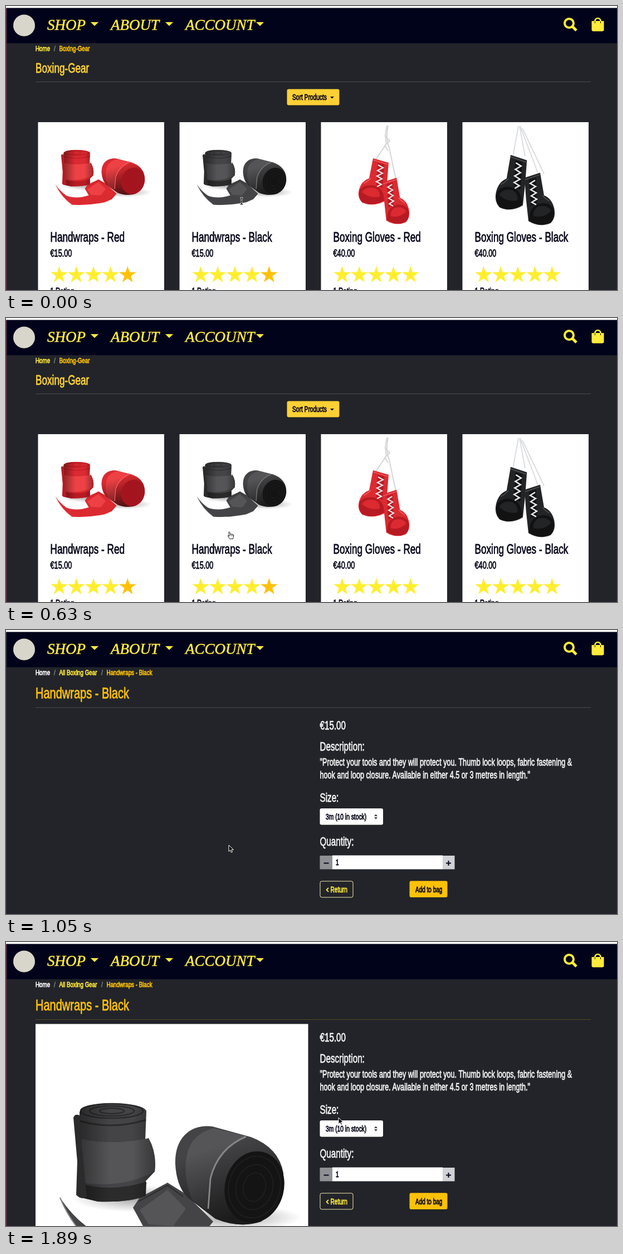
These frames come from a looping animation (1097x511 px, 1960 ms). An HTML page:

```html
<!DOCTYPE html>
<html lang="en">
<head>
<meta charset="utf-8">
<title>Boxing gear shop</title>
<style>
  html, body { margin: 0; height: 100%; overflow: hidden; background: #222429; }
  svg { display: block; width: 100%; height: 100%; }
  .body { font-family: "Liberation Sans", Arial, sans-serif; stroke-width: .8; }
  .nav { font: italic 27px "Liberation Serif", "Times New Roman", serif; fill: #ffeb3b; stroke: #ffeb3b; stroke-width: .6; }
</style>
</head>
<body>
<svg id="stage" viewBox="0 0 1097 511" xmlns="http://www.w3.org/2000/svg"></svg>
<script>
const LOOP = 1960, TICK = 70;
const CONDENSE = 0.715; // one narrow face for all body text
const YELLOW = '#ffeb3b', AMBER = '#ffc107', INK = '#07071a', PALE = '#f1f1f2';

const text = (x, y, size, str, fill) =>
  `<text class="body" transform="translate(${x} ${y}) scale(${CONDENSE} 1)" font-size="${size}" fill="${fill}" stroke="${fill}">${str}</text>`;
const rect = (x, y, w, h, fill, r = 0, more = '') =>
  `<rect x="${x}" y="${y}" width="${w}" height="${h}" rx="${r}" fill="${fill}" ${more}/>`;
const path = (d, fill, more = '') => `<path d="${d}" fill="${fill}" ${more}/>`;
const line = (d, color, width, more = '') =>
  path(d, 'none', `stroke="${color}" stroke-width="${width}" ${more}`);
const ellipse = (x, y, rx, ry, fill, more = '') =>
  `<ellipse cx="${x}" cy="${y}" rx="${rx}" ry="${ry}" fill="${fill}" ${more}/>`;
const group = (content, attrs) => `<g ${attrs}>${content}</g>`;
const caret = (x, y, w, h, fill) => path(`M${x} ${y}h${w}l${-w / 2} ${h}z`, fill);

function star(cx, cy, r, fill) {
  const points = Array.from({ length: 10 }, (_, i) => {
    const a = i * Math.PI / 5, d = i % 2 ? r * 0.39 : r;
    return `${(cx + d * Math.sin(a)).toFixed(1)},${(cy - d * Math.cos(a)).toFixed(1)}`;
  });
  return `<polygon points="${points.join(' ')}" fill="${fill}"/>`;
}

const RED = { main: '#dc2a31', band: '#ee4145', dark: '#b81a23', face: '#a3141e', edge: '#f4696b' };
const BLACK = { main: '#444446', band: '#555557', dark: '#2b2b2c', face: '#141415', edge: '#858587' };
const BLACK_GLOVE = { main: '#232425', dark: '#121213', edge: '#505153' };

// Two rolled wraps and a loose strip, at the size of the product page.
function wraps(c) {
  const rings = (x, y, radii, width, more) => radii.map(([rx, ry]) =>
    ellipse(x, y, rx, ry, 'none', `stroke="${c.dark}" stroke-width="${width}" ${more}`)).join('');
  const tilt = 'transform="rotate(14 446 441)"';
  const standing = 'M132 306Q137 291 188 290Q246 291 252 304L250 356L256 353Q271 380 267 413L251 430V457Q220 469 165 467L132 459Z';
  const lying = 'M304 400C302 350 334 327 371 332L440 351Q490 370 498 416Q499 472 458 503Q420 516 376 498L325 459Q306 438 304 400Z';

  const strip = path('M97 460Q118 492 145 512Q190 530 246 511L228 478L240 460L290 433L322 453L372 503L350 530L318 545Q235 562 170 556Q121 518 97 460Z', c.main)
    + path('M240 482L290 446L323 480L300 511L256 508Z', c.band)
    + line('M238 467L290 438L318 458', c.dark, 2)
    + line('M97 460Q121 518 170 556', c.edge, 2);
  const leftRoll = path(standing, c.main)
    + rings(190, 304, [[56, 13], [40, 9], [22, 5]], 2.5, '')
    + line('M133 322Q190 339 251 320M137 437Q190 452 252 433', c.dark, 3)
    + path('M133 354Q190 367 256 353Q271 380 267 413Q210 444 133 433Z', c.band)
    + path('M134 437Q195 450 252 432L251 457Q220 469 165 467L132 459Z', c.dark)
    + path(standing, 'url(#round)')
    + path('M121 316Q124 308 132 312L137 376L145 458Q136 465 126 455L128 395Z', c.dark);
  const rightRoll = path(lying, c.main)
    + path('M323 396Q326 348 372 335L431 349Q383 372 365 423L360 484L334 464Q320 430 323 396Z', c.band)
    + path(lying, 'url(#fall)')
    + line('M431 350Q381 371 367 425L363 480', c.edge, 3)
    + ellipse(446, 441, 53, 65, c.face, tilt)
    + rings(446, 441, [[46, 56], [33, 41], [20, 26]], 2, tilt + ' opacity=".45"');
  return ellipse(235, 462, 115, 24, 'url(#shade)') + ellipse(405, 496, 125, 24, 'url(#shade)')
    + strip + leftRoll + rightRoll;
}

// Left-hand glove in a 56 by 84 box.
function glove(c, transform) {
  return group(
    path('M27 0L55 8Q53 42 48 77Q28 88 8 80Q-2 71 2 56Q6 41 20 36Z', c.main)
    + path('M3 57Q12 45 32 50Q47 56 47 76Q26 87 8 79Q0 71 3 57Z', c.dark)
    + path('M7 61Q14 50 31 54Q40 59 39 69Q22 73 7 61Z', c.main)
    + line('M27 3L54 11M23 36Q16 43 10 45', c.edge, 1.3)
    + path('M35 8L47 11L44 53L33 50Z', c.dark)
    + line('M36 12l9 5l-10 5l9 5l-10 5l9 5l-10 5l9 5l-8 4', '#e9e9e9', 2.2), `transform="${transform}"`);
}

const smallWraps = (x, c) => group(wraps(c), `transform="translate(${x - 9.1} 151.7) scale(.397 .37)"`);

const redGloves = line('M684 215Q679 233 683 248L664 276M686 215Q681 238 688 255L701 317M680 233l9 10l-9 8l6 10', '#d5d6d8', 2)
  + glove(RED, 'translate(632 274)')
  + glove(RED, 'translate(725 309) scale(-.88 1)');
const blackGloves = line('M920 216L910 271M922 216L932 270M923 216L956 303M927 220L966 302', '#dcdde0', 2)
  + glove(BLACK_GLOVE, 'translate(878 268) scale(1.04 1.18)')
  + glove(BLACK_GLOVE, 'translate(986 300) scale(-1 1.13)');

function card(i, name, price, lastStar, picture) {
  const x = 57.5 + 254 * i;
  const stars = [0, 1, 2, 3, 4].map(n =>
    star(x + 38 + 30.7 * n, 484, 16, n === 4 ? lastStar : '#ffee2e')).join('');
  return rect(x, 209, 226.5, 302, '#fff') + picture
    + text(x + 22, 424, 24, name, INK) + text(x + 22, 451, 17.8, price, INK)
    + stars + text(x + 22, 519, 16, '1 Rating', INK);
}

const navbar = rect(0, 0, 1097, 4, '#fbfdfc') + rect(0, 3.5, 1097, 63.5, '#01031b')
  + '<circle cx="32.5" cy="35" r="19.5" fill="#d8d6cb"/>'
  + [['SHOP', 74, 152], ['ABOUT', 188, 286], ['ACCOUNT', 322, 449]].map(([label, x, arrow]) =>
    `<text class="nav" x="${x}" y="43">${label}</text>` + caret(arrow, 29, 14, 7, YELLOW)).join('');

const icons = line('M1017 37L1024 44', YELLOW, 5)
  + `<circle cx="1011" cy="31" r="8" fill="none" stroke="${YELLOW}" stroke-width="4"/>`
  + path('M1051.5 27h22v15.500q0 3-3 3h-16q-3 0-3-3z', YELLOW)
  + line('M1057.5 31v-4a5 5 0 0 1 10 0v4', '#01031b', 1)
  + line('M1057.5 27.500v-.5a5 5 0 0 1 10 0v.5', YELLOW, 2.6);

const crumb = (x, str, fill) => text(x, 81, 13.7, str, fill);
const slash = x => crumb(x, '/', '#7b8086');

const listing = crumb(53, 'Home', YELLOW) + slash(86) + crumb(95.5, 'Boxing-Gear', AMBER)
  + text(53, 120, 24, 'Boxing-Gear', '#fdd335')
  + rect(53, 136, 997, 1, '#4b4c4f')
  + rect(504.5, 149.5, 94, 29, '#fdd034', 3)
  + text(514, 169, 14.3, 'Sort Products', INK) + caret(582, 163, 7, 3.5, INK)
  + card(0, 'Handwraps - Red', '€15.00', AMBER, smallWraps(60, RED))
  + card(1, 'Handwraps - Black', '€15.00', AMBER, smallWraps(314, BLACK))
  + card(2, 'Boxing Gloves - Red', '€40.00', '#ffee2e', redGloves)
  + card(3, 'Boxing Gloves - Black', '€40.00', '#ffee2e', blackGloves);

const heading = (y, str) => text(563.5, y, 21.3, str, PALE);

const detail = crumb(53, 'Home', '#fff') + slash(86) + crumb(95.5, 'All Boxing Gear', YELLOW)
  + slash(171) + crumb(180.5, 'Handwraps - Black', AMBER)
  + text(53, 123, 28, 'Handwraps - Black', AMBER)
  + '<rect id="rule" x="53" y="139" width="997" height="1"/>'
  + heading(179, '€15.00') + heading(217, 'Description:')
  + text(563.5, 244, 17.7, '"Protect your tools and they will protect you. Thumb lock loops, fabric fastening &amp;', PALE)
  + text(563.5, 267, 17.7, 'hook and loop closure. Available in either 4.5 or 3 metres in length."', PALE)
  + heading(309, 'Size:')
  + rect(563.5, 321, 113.5, 29.5, '#fff', 3) + text(574, 341, 14.4, '3m (10 in stock)', INK)
  + path('M661 335l3-3.500l3 3.500zM661 337l3 3.500l3-3.500z', '#343a40')
  + heading(388, 'Quantity:')
  + rect(563.5, 406, 22.5, 24.5, '#8f9094') + rect(586, 405.5, 198, 25, '#fff') + rect(784, 406, 21.5, 24.5, '#d0d2d5')
  + rect(570.5, 418.5, 9, 2, INK) + rect(790, 418.5, 9, 2, INK) + rect(793.5, 415, 2, 9, INK)
  + text(592, 423, 14, '1', INK)
  + rect(564, 452, 59, 29, 'none', 3, 'stroke="#f4eab0"')
  + line('M579 464l-3.500 3.500l3.500 3.500', YELLOW, 1.8) + text(582.5, 472, 14.1, 'Return', YELLOW)
  + rect(724.5, 451.5, 68, 29.5, AMBER, 3) + text(735, 472, 14, 'Add to bag', INK);

const photo = rect(53, 147.5, 489.5, 363.5, '#fff') + wraps(BLACK);

const outlined = 'stroke-width="1" stroke-linejoin="round"';
const beam = 'M-2.500-6q2.500 0 2.500 2v8q0 2-2.500 2M2.500-6q-2.500 0-2.500 2v8q0 2 2.500 2M-1.500 1h3';
const pointers = {
  beam: line(beam, '#fff', 2.6) + line(beam, '#111', 1.2),
  hand: path('M-1 1Q0-1 1 1L2 5Q4 3.500 4.500 5Q6 4 6.500 5.500Q8 5 8 7L7 13H1L-2 8.500Q-3 6.500-1 7L.2 8.500Z', '#fff', `stroke="#222" ${outlined}`)
    + line('M2 5l.5 3M4.500 5.500v2.500M6.500 6v2', '#222', .8),
  arrow: path('M0 0V11.500L2.700 9L4.500 13.200L6.500 12.400L4.700 8.300H8.300Z', '#060606', `stroke="#fff" ${outlined}`)
};

const stop = (offset, color, opacity) =>
  `<stop offset="${offset}" stop-color="${color}" stop-opacity="${opacity}"/>`;

const stage = document.getElementById('stage');
stage.innerHTML = `<defs>
  <radialGradient id="shade">${stop(0, '#777', .65) + stop(1, '#777', 0)}</radialGradient>
  <linearGradient id="round">${stop(0, '#000', .4) + stop(.4, '#000', 0) + stop(.7, '#000', 0) + stop(1, '#000', .35)}</linearGradient>
  <linearGradient id="fall" x2=".35" y2="1">${stop(.3, '#000', 0) + stop(1, '#000', .6)}</linearGradient>
  </defs>`
  + rect(0, 0, 1097, 511, '#222429') + navbar
  + group(icons, 'id="icons"') + group(listing, 'id="listing"')
  + group(detail, 'id="detail"') + group(photo, 'id="photo"')
  + '<rect id="edge" y="4" width="1.5" height="507"/>'
  + group(Object.entries(pointers).map(([id, art]) => group(art, `id="${id}"`)).join(''), 'id="pointer"');

const get = id => document.getElementById(id);
const show = (id, on) => get(id).setAttribute('visibility', on ? 'visible' : 'hidden');

// Pointer stops: time, x, y.
const route = [[210, 423, 351], [420, 403, 375], [560, 401, 383], [770, 400, 387],
  [1680, 400, 387], [1750, 440, 373], [1820, 520, 344], [1890, 597, 316]];

function pointerAt(t) {
  const next = route.findIndex(([time]) => time > t);
  if (next < 0) return route[route.length - 1].slice(1);
  if (next === 0) return route[0].slice(1);
  const [t0, x0, y0] = route[next - 1], [t1, x1, y1] = route[next];
  const k = (t - t0) / (t1 - t0);
  return [x0 + (x1 - x0) * k, y0 + (y1 - y0) * k];
}

function draw(time) {
  const t = Math.floor((time % LOOP) / TICK) * TICK;
  const loading = t === 980, photoReady = t >= 1120;
  show('listing', t < 980);
  show('icons', !loading);
  show('detail', t >= 1050);
  show('photo', photoReady);
  get('rule').setAttribute('fill', photoReady ? '#514a25' : '#484b4e');
  get('edge').setAttribute('fill', t === 1050 ? '#292b30' : '#542b38');

  show('beam', t < 280);
  show('hand', t >= 280 && t < 910);
  show('arrow', t >= 910);
  get('pointer').setAttribute('transform', `translate(${pointerAt(t).join(' ')})`);
}

const start = performance.now();
function loop(now) {
  draw(Math.max(0, now - start));
  requestAnimationFrame(loop);
}
draw(0);
requestAnimationFrame(loop);
</script>
</body>
</html>
```
